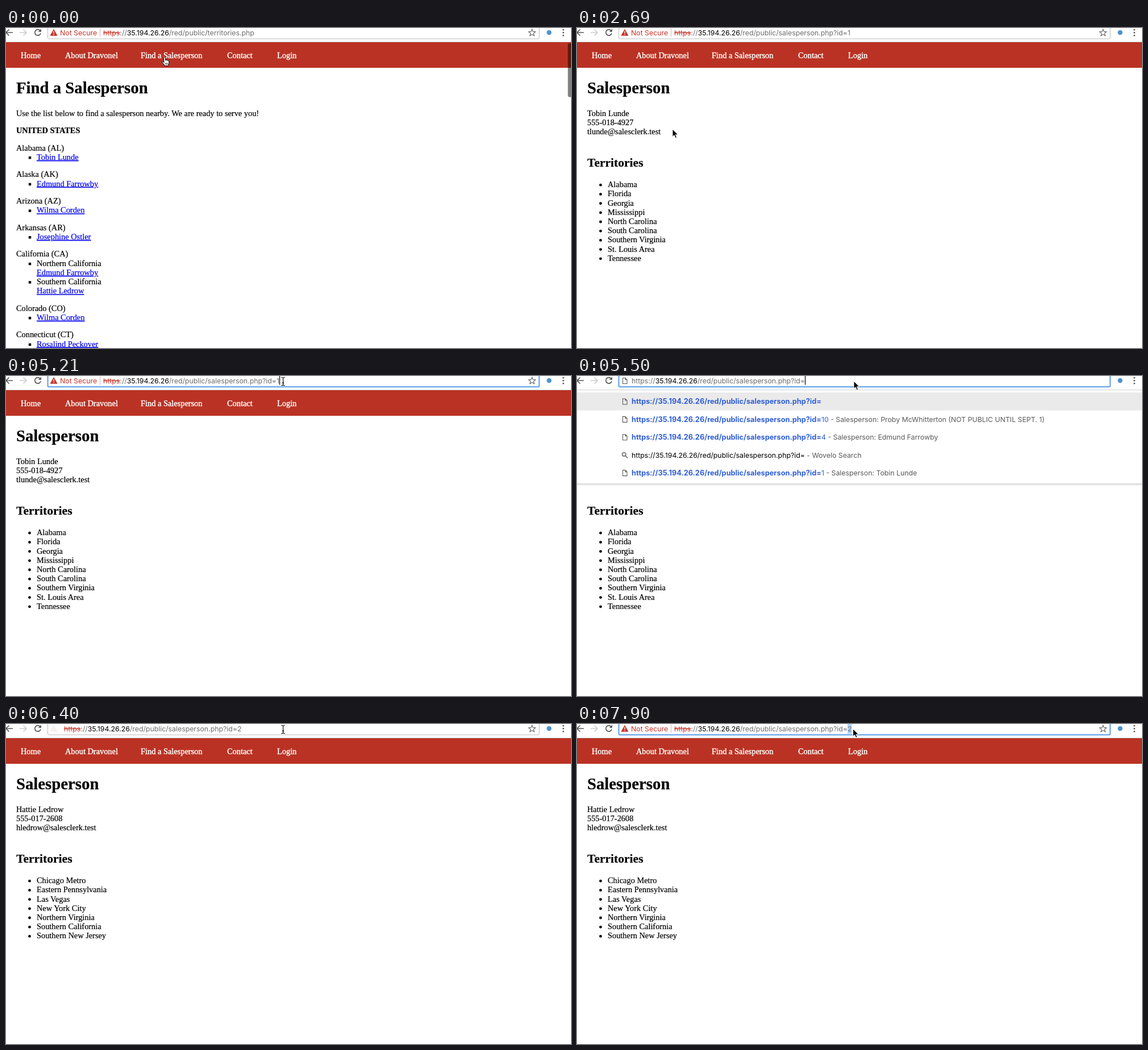
These frames come from a looping animation (994x563 px, 8 s). An HTML page:

```html
<!DOCTYPE html>
<html lang="en">
<head>
<meta charset="utf-8">
<title>Salesperson lookup</title>
<style>
html, body { margin: 0; width: 100%; height: 100%; overflow: hidden; background: #fff; }
svg { display: block; width: 100vw; height: 100vh; }
text { white-space: pre; }
.page { font: 14.36px "Liberation Serif", "Times New Roman", serif; }
.page text { stroke: #000; stroke-width: .2px; }
.page .h1 { font-size: 28.75px; font-weight: 700; }
.page .h2 { font-size: 21.55px; font-weight: 700; }
.page .b { font-weight: 700; }
.page .link { fill: #00e; stroke: #00e; text-decoration: underline; }
.page .nav { fill: #fff; stroke: #fff; stroke-width: .4px; }
.ui { font: 12.3px Inter, Roboto, sans-serif; }
.bad { fill: #c5352a; text-decoration: line-through; }
.dim { fill: #6e6e6e; }
.hit { fill: #2f5fd6; }
.bold { font-weight: 700; font-size: 12.75px; }
.note { fill: #5a5a5a; }
.line { fill: none; stroke: #5a5a5a; stroke-width: 1.7; }
.thin { fill: none; stroke: #5a5a5a; stroke-width: 1.1; }
</style>
</head>
<body>
<svg viewBox="0 0 994 563" preserveAspectRatio="none">
  <defs>
    <g id="doc"><path class="thin" d="M80.5 3.5h4.5l3 3v7h-7.5zM85 3.5v3h3"/></g>
    <linearGradient id="shade" x2="0" y2="1">
      <stop offset="0" stop-color="#d2d2d2"/><stop offset="1" stop-color="#fff"/>
    </linearGradient>
  </defs>

  <g class="page">
    <g id="list"></g>
    <g id="one"></g>
    <g id="two"></g>
    <g id="nav"><rect y="25" width="994" height="45" fill="#ba3223"/></g>
    <rect id="scroll" x="988.5" y="27" width="8" height="94.5" rx="3" fill="#000" opacity=".5"/>
  </g>

  <g class="ui">
    <rect width="994" height="24.5" fill="#fff"/>
    <rect y="24" width="994" height="1" fill="#cfcfcf"/>
    <path class="line" d="M12 8H0M5.5 2.5L0 8l5.5 5.5"/>
    <path class="line" style="stroke:#cdcdcd" d="M24 8h12M30.5 2.5L36 8l-5.5 5.5"/>
    <g id="reload">
      <path class="line" d="M60 4.6A5.2 5.2 0 1 0 61 9.2"/>
      <path d="M62 1.5v5.3h-5.3z" fill="#5a5a5a"/>
    </g>
    <path id="stop" class="line" d="M51 3l10 10M61 3L51 13"/>
    <rect id="box" x="73.5" y="-8" width="864.5" height="27" rx="2" fill="#fff"/>
    <path id="star" class="thin" d="M925.5 2.3l1.7 4 4.3.3-3.3 2.8 1.1 4.2-3.8-2.3-3.8 2.3 1.1-4.2-3.3-2.8 4.3-.3z"/>
    <circle cx="955.5" cy="8" r="4.2" fill="#4b93d1"/>
    <g fill="#5a5a5a"><circle cx="980.5" cy="3.2" r="1.4"/><circle cx="980.5" cy="8.2" r="1.4"/><circle cx="980.5" cy="13.2" r="1.4"/></g>
    <g id="chip">
      <path d="M84 2.4L90 13.2H78z" fill="#c5352a" stroke="#c5352a" stroke-width=".8" stroke-linejoin="round"/>
      <path d="M84 5.6v3.8M84 10.6v1.4" stroke="#fff" stroke-width="1.3"/>
      <g id="label">
        <text x="95" y="12.5" fill="#c5352a">Not Secure</text>
        <rect x="165" y="1" width="1" height="14.5" fill="#d9b0ac"/>
      </g>
    </g>
    <use id="plain" href="#doc"/>
    <rect id="sel" y="0" height="17" fill="#b1d5fc"/>
    <text id="url" y="12.5"></text>
    <rect id="caret" y="0" width="1.2" height="15.5" fill="#000"/>
    <g id="drop"></g>
  </g>

  <g id="hand" stroke="#000" stroke-linejoin="round">
    <path fill="#fff" d="M4 .8C5 .3 6 .9 6.1 1.8L6.6 6l.6-.6C8 4.9 8.8 5.2 9 6c.8-.6 1.8-.3 2 .5 1-.4 1.7.2 1.7 1.3v2.7c0 2-1.2 2.5-1.4 5H5.2C4.8 13.5 2.5 11.8.8 9.3.3 8.3 1.5 7.6 2.4 8.2L4 9.8 3.2 2.2C3.1 1.5 3.4 1 4 .8z"/>
    <path fill="none" stroke-width=".8" d="M6.6 10.5v3M8.4 10.5v3M10.2 10.5v3"/>
  </g>
  <path id="arrow" d="M0 0V13.4L3.1 10.6l2.1 5 2.3-1-2.1-4.8h4.3z" stroke="#fff" stroke-width="1" stroke-linejoin="round"/>
  <g id="beam" fill="none">
    <path id="stem" d="M-3.3-7.3Q-.5-7.3 0-6 .5-7.3 3.3-7.3M-3.3 7.3Q-.5 7.3 0 6 .5 7.3 3.3 7.3M0-6V6M-1.8 2.6H1.8"/>
    <use href="#stem" stroke="#fff" stroke-width="2.6" opacity=".8"/>
    <use href="#stem" stroke="#000" stroke-width="1.1"/>
  </g>
</svg>

<script>
const $ = id => document.getElementById(id);
const add = (g, s) => g.insertAdjacentHTML('beforeend', s);
const put = (g, x, y, s, c = '') => add(g, `<text x="${x}" y="${y}" class="${c}">${s}</text>`);
const show = (id, on) => $(id).style.display = on ? '' : 'none';
const LINE = 16.2;

const reps = {
  one: { name: 'Tobin Lunde', phone: '555-018-4927', mail: 'tlunde@salesclerk.test',
    areas: ['Alabama', 'Florida', 'Georgia', 'Mississippi', 'North Carolina', 'South Carolina',
      'Southern Virginia', 'St. Louis Area', 'Tennessee'] },
  two: { name: 'Hattie Ledrow', phone: '555-017-2608', mail: 'hledrow@salesclerk.test',
    areas: ['Chicago Metro', 'Eastern Pennsylvania', 'Las Vegas', 'New York City', 'Northern Virginia',
      'Southern California', 'Southern New Jersey'] }
};
const farr = 'Edmund Farrowby', cord = 'Wilma Corden';
const states = [
  ['Alabama (AL)', reps.one.name], ['Alaska (AK)', farr], ['Arizona (AZ)', cord],
  ['Arkansas (AR)', 'Josephine Ostler'],
  ['California (CA)', '-Northern California', farr, '-Southern California', reps.two.name],
  ['Colorado (CO)', cord], ['Connecticut (CT)', 'Rosalind Peckover']
];

function buildNav() {
  const items = [[26, 'Home'], [104, 'About Dravonel'], [237, 'Find a Salesperson'], [389, 'Contact'], [477, 'Login']];
  for (const [x, s] of items) put($('nav'), x, 53, s, 'nav');
}

function buildList() {
  const g = $('list');
  put(g, 18, 115, 'Find a Salesperson', 'h1');
  put(g, 18, 154.5, 'Use the list below to find a salesperson nearby. We are ready to serve you!');
  put(g, 18, 185, 'UNITED STATES', 'b');
  let y = 215.6;
  for (const [state, ...rows] of states) {
    put(g, 18, y, state);
    rows.forEach((row, i) => {
      y += LINE;
      const area = row[0] === '-';
      if (area || !i) add(g, `<rect x="39.8" y="${y - 5.8}" width="4.4" height="4.4"/>`);
      put(g, 54, y, area ? row.slice(1) : row, area ? '' : 'link');
    });
    y += 30.5;
  }
}

function buildRep(id) {
  const g = $(id), r = reps[id];
  put(g, 18, 115, 'Salesperson', 'h1');
  [r.name, r.phone, r.mail].forEach((s, i) => put(g, 18, 154.5 + i * LINE, s));
  put(g, 18, 244, 'Territories', 'h2');
  r.areas.forEach((s, i) => {
    const y = 280.2 + i * LINE;
    add(g, `<circle cx="41.5" cy="${y - 4}" r="2.4"/>`);
    put(g, 54, y, s);
  });
}

const HOST = '35.194.26.26', DIR = '/red/public/', REP = 'salesperson.php?id=';
const LINK = 'https://' + HOST + DIR + REP;

function fillDrop(typed) {
  const g = $('drop');
  const hit = (n, who) => `<tspan class="hit bold">${LINK}</tspan><tspan class="hit">${n}</tspan><tspan class="note"> - Salesperson: ${who}</tspan>`;
  const rows = [
    `<tspan class="hit bold">${LINK + typed}</tspan>`,
    hit(10, 'Proby McWhitterton (NOT PUBLIC UNTIL SEPT. 1)'),
    hit(4, farr),
    `${LINK + typed}<tspan class="note"> - Wovelo Search</tspan>`,
    hit(1, reps.one.name)
  ];
  g.innerHTML = '<rect y="25" width="994" height="165" fill="#fff"/><rect y="29" width="994" height="31.5" fill="#eaeaea"/>' +
    '<rect y="189" width="994" height="4.5" fill="url(#shade)"/>';
  rows.forEach((s, i) => {
    const y = 45 + i * 31.4;
    add(g, i === 3
      ? `<path class="thin" style="stroke-width:1.4" d="M86 ${y - 1.4}a3.2 3.2 0 1 0-6.4 0a3.2 3.2 0 1 0 6.4 0M85 ${y + 1}l4 4"/>`
      : `<use href="#doc" y="${y - 8.5}"/>`);
    put(g, 96, y + 4.4, s);
  });
}

// Each step lists only what changes: cur [shape, x, y], sel 'all' | 'last'
const steps = [
  [0, { cur: ['hand', 274, 51], page: 'list', path: 'territories.php', at: 171, chip: 1, label: 1 }],
  [150, { cur: ['hand', 261, 50] }],
  [740, { cur: ['arrow', 227, 243] }],
  [1040, { cur: ['arrow', 143, 222] }],
  [1190, { cur: ['beam', 94, 214] }],
  [1490, { cur: ['hand', 85, 225] }],
  [1640, { cur: ['hand', 84, 227.5] }],
  [2090, { busy: 1 }],
  [2240, { busy: 0, page: 'one', path: REP + 1 }],
  [2540, { cur: ['arrow', 103, 219] }],
  [2690, { cur: ['arrow', 168, 178] }],
  [2840, { cur: ['arrow', 275, 112] }],
  [2990, { cur: ['arrow', 388, 52] }],
  [3140, { cur: ['arrow', 452, 20] }],
  [3290, { cur: ['beam', 478, 9] }],
  [3430, { cur: ['arrow', 478.5, 8.5], focus: 1, sel: 'all' }],
  [3730, { cur: ['beam', 482, 9.5] }],
  [3880, { cur: ['beam', 487, 9.5] }],
  [4020, { cur: ['beam', 488, 9.5], sel: '', caret: 1 }],
  [4470, { cur: ['beam', 487.5, 9.5] }],
  [4610, { caret: 0 }],
  [5210, { caret: 1 }],
  [5500, { cur: ['arrow', 487, 9], path: REP, at: 96, chip: 0, label: 0, edit: 1, drop: 1, typed: '' }],
  [5650, { path: REP + 2 }],
  [5800, { typed: '2' }],
  [6250, { cur: ['beam', 487.5, 9.5], drop: 0, focus: 0, caret: 0 }],
  [6400, { page: 'two', edit: 0, at: 102, chip: .08 }],
  [6550, { at: 150, chip: .6, label: .6 }],
  [6700, { at: 171, chip: 1, label: 1 }],
  [7300, { cur: ['beam', 486.8, 9.5] }],
  [7450, { cur: ['beam', 486.3, 9.5] }],
  [7750, { cur: ['arrow', 485.5, 8.5], focus: 1, sel: 'all' }],
  [7900, { sel: 'last' }]
];

function draw(s) {
  for (const id of ['list', 'one', 'two']) show(id, s.page === id);
  show('scroll', s.page === 'list');
  show('stop', s.busy);
  show('reload', !s.busy);

  $('box').setAttribute('stroke', s.focus ? '#73aceb' : '#bcbcbc');
  $('box').setAttribute('stroke-width', s.focus ? 2.4 : 1);
  $('chip').setAttribute('opacity', s.chip);
  $('label').setAttribute('opacity', s.label);
  show('plain', s.edit);
  show('star', !s.edit);

  const url = $('url');
  url.setAttribute('x', s.at);
  url.innerHTML = (s.edit ? '<tspan class="dim">https://</tspan>' : '<tspan class="bad">https</tspan><tspan class="dim">://</tspan>') +
    HOST + `<tspan class="dim">${DIR + s.path}</tspan>`;
  const end = s.at + url.getComputedTextLength();
  const from = s.sel === 'last' ? end - url.getSubStringLength(url.getNumberOfChars() - 1, 1) : s.at;
  show('sel', s.sel);
  $('sel').setAttribute('x', from);
  $('sel').setAttribute('width', end - from);
  show('caret', s.caret);
  $('caret').setAttribute('x', end);

  show('drop', s.drop);
  if (s.drop) fillDrop(s.typed);

  const [shape, x, y] = s.cur;
  for (const id of ['hand', 'arrow', 'beam']) show(id, id === shape);
  $(shape).setAttribute('transform', `translate(${x} ${y})`);
}

buildNav();
buildList();
buildRep('one');
buildRep('two');

const start = performance.now();
let last = -1;
function tick() {
  const t = (performance.now() - start) % 8000;
  const past = steps.filter(([at]) => at <= t);
  if (past.length !== last) {
    last = past.length;
    draw(Object.assign({}, ...past.map(p => p[1])));
  }
  requestAnimationFrame(tick);
}
tick();
</script>
</body>
</html>
```
